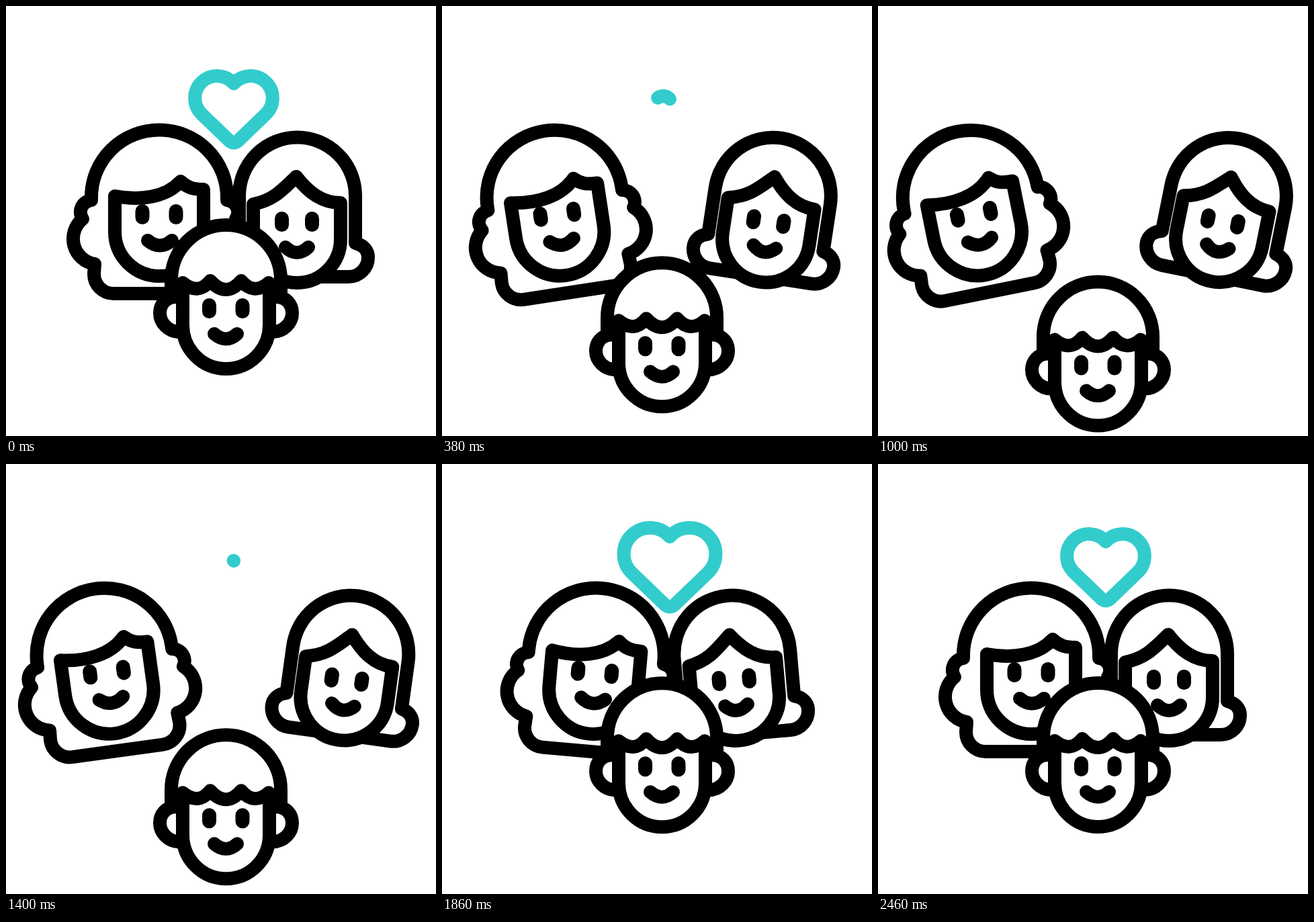
An HTML page that plays this animation: 640x640 px, repeating every 3600 ms.

```html
<!DOCTYPE html>
<html lang="en">
<head>
<meta charset="utf-8">
<title>Family</title>
<style>
  html, body { margin: 0; height: 100%; overflow: hidden; background: #fff; }
  svg { display: block; width: 100vw; height: 100vh; }
  path { fill: #fff; stroke: #000; stroke-width: 20; stroke-linecap: round; stroke-linejoin: round; }
  .line { fill: none; }
  .eyes { stroke-width: 21; }
  #heart { fill: none; stroke: #3cc; }
</style>
</head>
<body>
<svg viewBox="0 0 640 640">
  <path id="heart" pathLength="1" d="M339 115.4A33 33 0 1 0 291.7 161.3L333 201Q339 206 345 201L386.3 161.3A33 33 0 1 0 339 115.4"/>

  <g id="left">
    <path d="M127 289V284.5A101 100 0 0 1 329 284.5V289A18 18 0 0 1 342 317A38 38 0 0 1 324 384L325 399A29 29 0 0 1 296 428H160A29 29 0 0 1 131 399L132 384A38 38 0 0 1 114 317A18 18 0 0 1 127 289Z"/>
    <path d="M162 283V336A66 66 0 0 0 294 336V273C280 273 270 271 260 261C238 285 200 290 162 283Z"/>
    <path class="line eyes" d="M203 305.5v9M253 305.5v9"/>
    <path class="line" d="M211 349Q229 364 247 349"/>
  </g>

  <g id="right">
    <path d="M347 353V282.5A86.5 87 0 0 1 520 282.5V353C533 356 539 365 539 374A29 29 0 0 1 510 403H357A29 29 0 0 1 328 374C328 365 334 356 347 353Z"/>
    <path d="M368 295V347A65 65 0 0 0 498 347V293C470 293 450 277 432 254C410 275 398 289 368 295Z"/>
    <path class="line eyes" d="M410.5 316.5v9M455.5 316.5v9"/>
    <path class="line" d="M416 359Q433 375 450 359"/>
  </g>

  <g id="child">
    <path d="M263 433H253C238 433 229 444 229 457C229 472 242 485 258 485M392 433H402C417 433 426 444 426 457C426 472 413 485 397 485"/>
    <path d="M246 430V407.5A81.5 81.5 0 0 1 409 407.5V430"/>
    <path d="M263 413V475A64.5 65 0 0 0 392 475V413"/>
    <path class="line" d="M263 412Q286 431 304 409Q327.5 435 350 409Q369 431 391 412"/>
    <path class="line eyes" d="M302.5 445.5v9M352 445.5v9"/>
    <path class="line" d="M310 488Q327.5 503 344 488"/>
  </g>
</svg>
<script>
const LOOP = 3600;
const [heart, left, right, child] =
  ['heart', 'left', 'right', 'child'].map(id => document.getElementById(id));

// Progress from t0 to t1 along cubic-bezier(a, 0, b, 1)
function ease(t, t0, t1, a, b) {
  const x = (t - t0) / (t1 - t0);
  if (x <= 0) return 0;
  if (x >= 1) return 1;
  let lo = 0, hi = 1;
  for (let i = 0; i < 30; i++) {
    const s = (lo + hi) / 2, r = 1 - s;
    if (3 * a * s * r * r + 3 * b * s * s * r + s ** 3 < x) lo = s; else hi = s;
  }
  return lo * lo * (3 - 2 * lo);
}

function place(el, dx, angle, cx, cy) {
  el.setAttribute('transform', `translate(${dx} 0) rotate(${angle} ${cx} ${cy})`);
}

function draw(t) {
  const out = ease(t, 0, 1200, 1 / 3, 0);
  const spread = out - ease(t, 1200, 1900, 2 / 3, 1 / 3);
  const swing = ease(t, 1000, 1900, 2 / 3, 2 / 3);
  const settle = ease(t, 1900, 2400, 1 / 3, 0);
  const tilt = 11.4 * ease(t, 0, 1000, 1 / 3, 0) - 16.5 * swing + 5.1 * settle;

  place(left, -86.8 * spread, -tilt, 228, 306.5);
  place(right, 84.5 * spread, tilt, 433.5, 304);
  child.setAttribute('transform', `translate(0 ${85.5 * spread})`);

  const leaving = t < 1000;
  const size = leaving ? 1 - 0.91 * out : 1.19 * swing - 0.19 * settle;
  const trim = leaving ? 1 - ease(t, 0, 500, 1 / 3, 2 / 3) : ease(t, 1380, 1860, 1 / 3, 1 / 3);
  heart.style.display = trim > 0 ? '' : 'none';
  if (trim > 0) {
    heart.setAttribute('transform', `translate(339 154) scale(${size}) translate(-339 -154)`);
    heart.style.strokeWidth = 20 / size;
    heart.style.strokeDasharray = trim < 1 ? `${trim} 2` : 'none';
  }
}

const start = performance.now();
function tick() {
  draw((performance.now() - start) % LOOP);
  requestAnimationFrame(tick);
}
tick();
</script>
</body>
</html>
```
